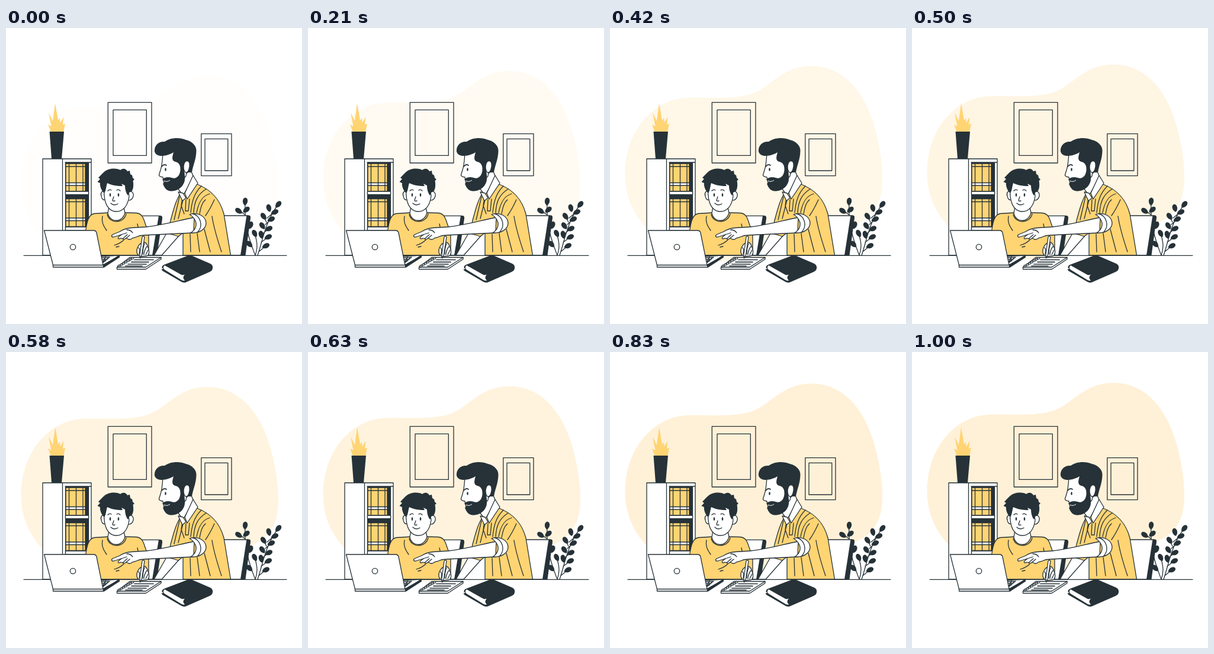
An HTML page for the animation above (1.04 s loop, 500x500 px).

```html
<!DOCTYPE html>
<html lang="en">
<head>
<meta charset="utf-8">
<title>Homework help</title>
<style>
  html, body { margin: 0; width: 100%; height: 100%; overflow: hidden; background: #fff; }
  svg { display: block; width: 100vw; height: 100vh; }
  .line, .white, .gold { stroke: #263238; stroke-width: 1.3; stroke-linecap: round; stroke-linejoin: round; }
  .line { fill: none; }
  .white { fill: #fff; }
  .gold { fill: #ffd473; }
  .dark { fill: #263238; }
  .bold { stroke-width: 1.7; }
</style>
</head>
<body>
<svg viewBox="0 0 500 500">
  <path id="blob" fill="#fff1d7" opacity="0" d="M25.500 235.500C25.500 160 75 105.500 135 105.500C180 105.500 212 107.500 238 99.500C270 89.500 290 52 340 52C396 52 429 98 444 146C454 178 460 212 460 243C460 285 444 307 412 321C360 346 290 382 200 382C120 382 25.500 330 25.500 235.500Z"/>

  <!-- picture frames -->
  <path class="line" d="M172.300 125.700H246V228H172.300ZM181 138.300H237.300V215.400H181ZM329.800 178.700H381V249.600H329.800ZM336 187.300H374.800V241H336Z"/>

  <!-- bookcase -->
  <path class="white" d="M62 221H144V384H62ZM95.500 221V384M100.500 227V342M95.500 221H144V227H100M139.500 227V384"/>
  <path class="dark" d="M100.500 227H139.500V276H100.500ZM100.500 281.500H139.500V342H100.500Z"/>
  <g id="shelf">
    <path class="gold" d="M101 229H134V276H101Z"/>
    <path class="line" d="M106.500 229V276M118.500 229V276M130 229V276M101 234H134"/>
    <path class="white" d="M101 261.500H134V266H101Z"/>
    <path class="line" d="M106.500 261V266M118.500 261V266M130 261V266"/>
  </g>
  <use href="#shelf" y="59.500"/>
  <path class="white" d="M100.500 276H139.500V281.500H100.500ZM100.500 336H139.500V342H100.500Z"/>

  <!-- pot plant -->
  <path fill="#ffd473" d="M76 176L71 163L76.500 166L72 143L79 157L83 127L88 156L91 152L91.500 160L97.500 150L96 163L100 162L97 176Z"/>
  <path class="dark" d="M73.500 175H98L94 221H77Z"/>

  <!-- leafy branches -->
  <path class="line" d="M425 384C434 358 438 326 460 298M421 384C412 360 402 335 404 293M421 384C426 370 424 360 420 347M394 308L403 315M435 318L440 328M453 311L441 321M448 323L438 332M444 339L434 347M443 353L431 362M439 368L428 377"/>
  <g id="leaves" class="dark"></g>

  <!-- chairs -->
  <path class="white" d="M225 317.300H260L248 384H225Z"/>
  <path class="dark" d="M258 317H262Q264.500 318 264 322L256 377L252 384H247Z"/>
  <path class="white" d="M360 317H409L398 384H365Z"/>
  <path class="dark" d="M406.500 316.500H411Q413.500 317 413 321L404.500 384H396Z"/>

  <!-- man: far arm and shirt -->
  <path fill="#fff" d="M263 384L285 345H300V384Z"/>
  <path class="white" d="M271 347L250 384H263L293 350V344Z"/>
  <path class="gold" d="M296 277C287 290 283 307 278 325L274 347L291 352L299 346V384H379.500L368 314C361 288 346 273 323 264Z"/>
  <path class="line" d="M293 285L284 324M299 290L291 322M298 287L296 300L301 314M304 290L303 309M310 289L308 309L303 309M330 267C318 279 314 292 312 312M338 272C324 281 318 292 317 312M344 280C331 284 325 295 322 312M337 290C331 295 329 303 327 314M352 290C347 301 342 310 337 317M311 348L312 378M323 347L327 378M335 340L345 378M348 318C351 338 358 360 364 378"/>

  <!-- man: neck, collar, head -->
  <path class="white" d="M291 272L299 283L317 252L312 240L297 252Z"/>
  <path class="white" d="M316 249L324 262L306 289L302 279Z"/>
  <path class="white" d="M299 279L304 287L298 292L291 277Z"/>
  <path class="white" d="M265 212C264 224 264 231 261 240L258.500 248Q258 251 265 252L268 268L290 267L304 250L309 220L286 207Z"/>
  <path class="dark" d="M251 209C250 198 258 191 268 192C277 185 293 184 304 189C316 192 322 200 321.500 208C321 223 316 231 314 244L307 244L302 228C299 238 303 246 302 256C301 267 291 276 278 275.500C270 275 267 268 265 263L268 260L264 256C267 252 274 251 280 253C288 256 294 249 294.500 240C295 232 292 227 286 226C279 224 281 217 283 210C275 215 267 216 261 216Q253 215 251 209Z"/>
  <path class="white" d="M301 229C303 223 309 223 310 229C311 236 308 245 303 244C300 241 299 234 301 229Z"/>
  <path d="M267 258Q272 261 277 257" fill="none" stroke="#fff"/>
  <ellipse class="dark" cx="269.500" cy="239" rx="1.300" ry="2.800"/>
  <path class="line bold" d="M263 234Q267 229 271 232"/>

  <!-- boy -->
  <path class="gold" d="M127 384L135 340C137 326 140 315 149 313.500L174 312H200L220 312.500C229 313 232 320 235 330L241 347V384Z"/>
  <path class="line" d="M163 318C161 328 165 335 170 342M222 331L225 345M183 367Q193 364 199 358M186 370L191 369"/>
  <path class="white" d="M174 301L172 313C176 330 197 329 201 312L198 299Z"/>
  <path class="line" d="M171 315C175 331 199 331 203 314"/>
  <path class="white" d="M167 276C162 274 159 279 161 284C162 290 165 291 168 290ZM206 277C211 273 216 278 215 284C213 291 208 292 205 290Z"/>
  <path class="white" d="M166 262C165 275 165 285 168 294C171 304 178 310 186 310C199 310 206 299 208 284L205 262L185 253Z"/>
  <path class="dark" d="M166 279C161 275 158 266 159 262L154.500 260L159 255L156 253C161 248 166 241 173 239C182 236 190 238 193 240C198 236 203 238 205 242L209 241L210 247C215 249 213 251 214 253L217 256L214.500 258C216 266 215 273 212 276L208 278L206 283C203 279 201 273 201 266L195 263L197 267C186 267 177 265 171 262C169 268 169 275 166 279Z"/>
  <g class="dark">
    <ellipse cx="176" cy="282" rx="1.300" ry="3"/>
    <ellipse cx="190" cy="282" rx="1.300" ry="3"/>
  </g>
  <path class="line" d="M172 275Q175 272 178 274M187 274Q190 272 193 275M182 285L180 291Q180 293 184 292M177 296Q182 301 189 297"/>

  <path class="line" d="M30 384.300H474"/>

  <!-- laptop -->
  <path class="white" d="M158 386L191 384L165 402L150 402Z"/>
  <path class="line bold" d="M161 388L175 387.500M162 391L171 390.500M163 394L168 393.500M168 387L165 393M174 387.500L164 396"/>
  <path class="dark" d="M163 400L192 383.500V387.500L165 405Z"/>
  <path class="white" d="M79.500 400H164.500V404H79.500Z"/>
  <path class="white" d="M64.500 342H148Q152 342 153 346L164 400.500H79.500Z"/>
  <circle class="line" cx="113" cy="370" r="4.700"/>

  <!-- notebook -->
  <path class="white" d="M187.500 404V407.500H236L262 390.500V387.500Z"/>
  <path class="white" d="M209 387.500H262L236 404H187.500Z"/>
  <path class="line bold" d="M217 391.500H249M212 395.300H241M206 399H237M202 402H230"/>
  <g id="rings" class="white"></g>

  <!-- writing hand -->
  <path class="white" d="M221 379C220 372 225 364 230 363C235 360 238 364 240 371C243 377 242 383 238 385L228 386C224 385 222 383 221 379Z"/>
  <path class="white" d="M230 353Q232 350 234 353L229.500 383L226.500 389L226 382Z"/>
  <path class="line" d="M224 371Q227 374 225 382M234 364Q231 372 231 382M238 369Q233 376 233 383M240 375L236 383"/>

  <!-- pointing arm -->
  <path class="white" d="M318 320C292 325 265 333 237 336L212 337.500C203 338 198 340 192 344L180 349C177 351 179 354 182 353L195 349L190 353C188 356 191 357 194 355L197 356Q200 358 203 355L207 357Q211 358 213 355L220 353Q226 350 233 350L317 346Z"/>
  <path class="line" d="M195 349L204 346M197 356L205 349M203 355L209 350M204 341Q211 341 214 346"/>
  <path class="white" d="M310 315C324 310 337 318 338 329C338 341 325 347 312 346C320 341 323 333 320 326Q317 319 310 315Z"/>
  <path class="line" d="M315 313.500C328 317 334 333 324 344.500"/>

  <!-- closed book -->
  <path class="dark" d="M263.500 405Q263 401 268 399.500L306 385Q311 383.500 316 385.500L345 398Q351 401 348.500 408Q348 410 344 412L304 429.500Q299 431 295 428L264 410L262.500 407.500L266 407Z"/>
  <path fill="#fff" d="M268 401Q264 404 267.500 408L296 425.500Q299.500 427.500 302 426.500Q297 421.500 302 416.500Q299 418 296 416.800Z"/>

</svg>
<script>
  const LOOP = 1040, FPS = 24, RISE = 30;
  const $ = id => document.getElementById(id);

  // x, y, tilt in degrees
  const leaves = [
    [404, 293, 5], [393, 309, -55], [406, 307, 50],
    [460, 298, 40], [444, 304, -15], [454, 311, 65], [435, 318, -35],
    [448, 323, 65], [433, 334, -35], [444, 339, 65], [413, 333, 20],
    [431, 349, -10], [443, 353, 65], [420, 347, -25], [439, 368, 65], [411, 365, -45]
  ];
  $('leaves').innerHTML = leaves.map(([x, y, a]) =>
    `<path transform="translate(${x} ${y}) rotate(${a})" d="M0 7C-6 3-5-6 0-6.500C5-6 6 3 0 7Z"/>`).join('');

  $('rings').innerHTML = Array.from({ length: 7 }, (_, i) =>
    `<ellipse cx="${191 + i * 3.8}" cy="${402 - i * 2.2}" rx="2" ry="1.500"/>`).join('');

  // cubic-bezier(0, 0, .58, 1), solved by bisection
  function easeOut(x) {
    let lo = 0, hi = 1;
    for (let i = 0; i < 24; i++) {
      const s = (lo + hi) / 2;
      if (s * s * (1.74 * (1 - s) + s) < x) lo = s; else hi = s;
    }
    return lo * lo * (3 - 2 * lo);
  }

  // The backdrop rises and fades in at a stepped 24 fps.
  function draw(now) {
    const t = now % LOOP;
    const step = Math.min(FPS, Math.max(1, Math.floor((t + 4.9) * FPS / 1000)));
    const p = easeOut(step / FPS);
    $('blob').setAttribute('transform', `translate(0 ${RISE * (1 - p)})`);
    $('blob').setAttribute('opacity', p);
  }

  const start = performance.now();
  function tick() {
    draw(performance.now() - start);
    requestAnimationFrame(tick);
  }
  tick();
</script>
</body>
</html>
```
